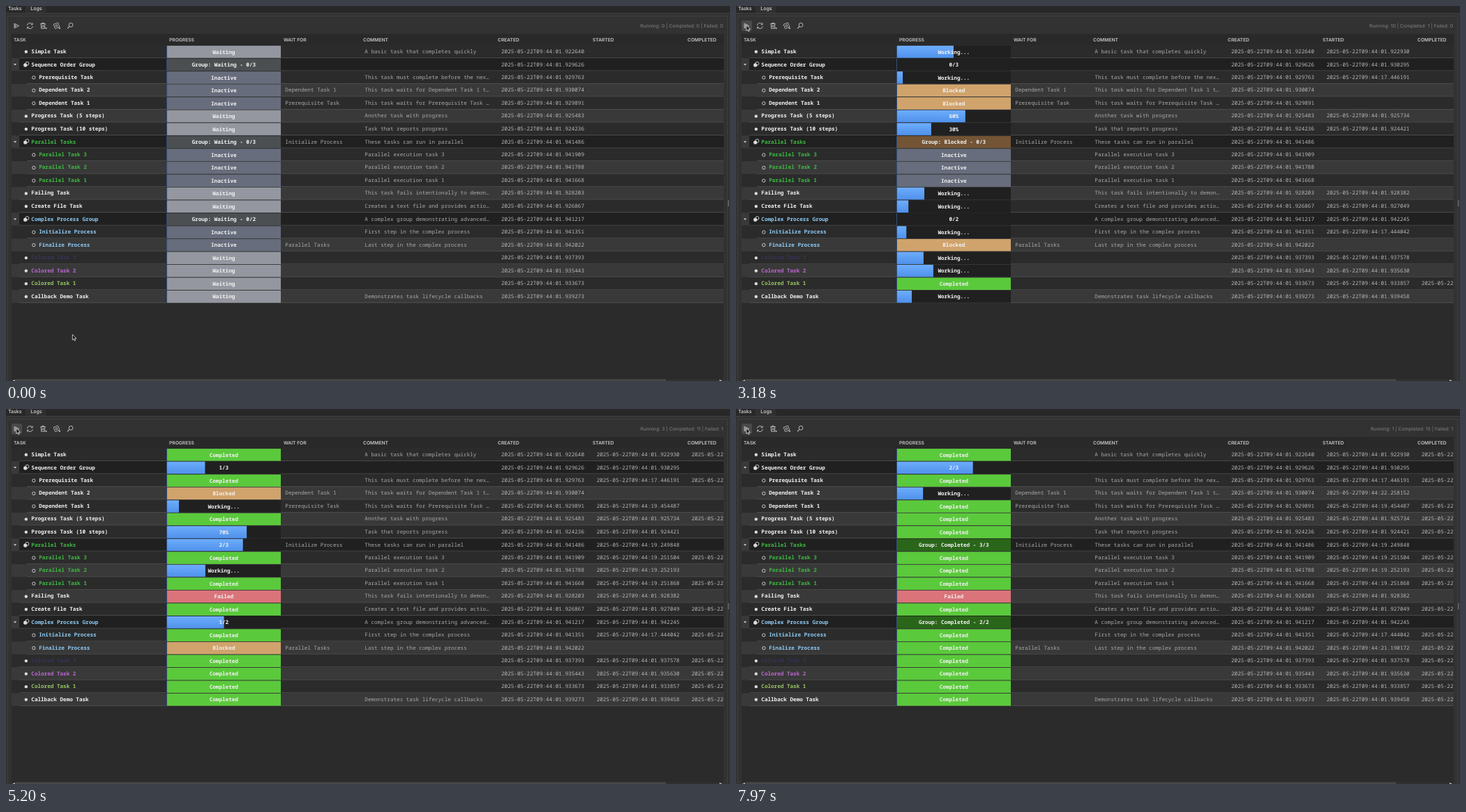
Recreate the animation shown at these times as an HTML page with a canvas. Size 1038 by 539 pixels, loop 8 s.

```html
<!DOCTYPE html>
<html lang="en">
<head>
<meta charset="utf-8">
<title>Task list</title>
<style>
html, body { margin: 0; width: 100%; height: 100%; overflow: hidden; background: #2b2b2b; }
canvas { display: block; width: 1038px; height: 539px; }
</style>
</head>
<body>
<canvas id="stage"></canvas>
<script>
const W = 1038, H = 539, LOOP = 8000;
const ROW_TOP = 56.4, ROW_H = 18.52, BAR_X = 231, BAR_W = 163;
const MONO = '"Noto Sans Mono", "DejaVu Sans Mono", monospace';
const SANS = 'Inter, Roboto, sans-serif';
const DAY = '2025-05-22T09:44:';
const WHITE = '#f2f2f2', GREEN = '#3dbb42', BLUE = '#8ecbf5';

const canvas = document.getElementById('stage');
const dpr = window.devicePixelRatio || 1;
canvas.width = W * dpr;
canvas.height = H * dpr;
const c = canvas.getContext('2d');
c.scale(dpr, dpr);

// start / end: when a task begins and stops working, in ms of the loop
const leaf = (name, created, started, start, end, more) =>
  ({ kind: 'leaf', name, created, started, start, end, ...more });
const child = (...args) => ({ ...leaf(...args), kind: 'child' });
const group = (name, created, started, start, size, more) =>
  ({ kind: 'group', name, created, started, start, size, ...more });

const rows = [
  leaf('Simple Task', '922640', '01.922930', 2078, 4110, { comment: 'A basic task that completes quickly' }),
  group('Sequence Order Group', '929626', '01.930295', 2270, 3),
  child('Prerequisite Task', '929763', '17.446191', 2276, 4335, { comment: 'This task must complete before the nex…' }),
  child('Dependent Task 2', '930074', '22.258152', 7184, 9200, { blocked: 2270, wait: 'Dependent Task 1', comment: 'This task waits for Dependent Task 1 t…' }),
  child('Dependent Task 1', '929891', '19.454487', 4345, 7175, { blocked: 2270, wait: 'Prerequisite Task', comment: 'This task waits for Prerequisite Task …' }),
  leaf('Progress Task (5 steps)', '925483', '01.925734', 2110, 4660, { steps: 5, comment: 'Another task with progress' }),
  leaf('Progress Task (10 steps)', '924236', '01.924421', 2100, 7200, { steps: 10, comment: 'Task that reports progress' }),
  group('Parallel Tasks', '941486', '19.249848', 4140, 3, { blocked: 2265, color: GREEN, wait: 'Initialize Process', comment: 'These tasks can run in parallel' }),
  child('Parallel Task 3', '941909', '19.251504', 4150, 5060, { color: GREEN, comment: 'Parallel execution task 3' }),
  child('Parallel Task 2', '941788', '19.252193', 4150, 6120, { color: GREEN, comment: 'Parallel execution task 2' }),
  child('Parallel Task 1', '941668', '19.251868', 4150, 5000, { color: GREEN, comment: 'Parallel execution task 1' }),
  leaf('Failing Task', '928203', '01.928382', 2404, 4950, { fails: true, comment: 'This task fails intentionally to demon…' }),
  leaf('Create File Task', '926867', '01.927049', 2254, 3750, { comment: 'Creates a text file and provides actio…' }),
  group('Complex Process Group', '941217', '01.942245', 2260, 2, { color: BLUE, comment: 'A complex group demonstrating advanced…' }),
  child('Initialize Process', '941351', '17.444042', 2262, 4140, { color: BLUE, comment: 'First step in the complex process' }),
  child('Finalize Process', '942022', '21.190172', 6134, 7660, { blocked: 2262, color: BLUE, wait: 'Parallel Tasks', comment: 'Last step in the complex process' }),
  leaf('Colored Task 3', '937393', '01.937578', 2195, 3220, { color: '#35355a' }),
  leaf('Colored Task 2', '935443', '01.935630', 2439, 3460, { color: '#bd68d3' }),
  leaf('Colored Task 1', '933673', '01.933857', 2137, 3160, { color: '#98c568' }),
  leaf('Callback Demo Task', '939273', '01.939458', 2355, 4390, { comment: 'Demonstrates task lifecycle callbacks' }),
];

const FILLS = {
  Waiting: '#94979f', Inactive: '#676d7c', Blocked: '#d0a36c',
  Completed: '#5bc93c', Failed: '#da747a',
};
const GROUP_FILLS = { Waiting: '#4c4f52', Blocked: '#735536', Completed: '#2a661a' };

// Each state is { label, fill } for a flat bar or { label, part } for a progress bar
function leafState(row, t) {
  if (t >= row.end) {
    const label = row.fails ? 'Failed' : 'Completed';
    return { label, fill: FILLS[label] };
  }
  if (t >= row.start) {
    if (row.steps) {
      const done = Math.min(row.steps, Math.floor((t - row.start) / 510) + 1);
      return { label: done * 100 / row.steps + '%', part: done / row.steps, running: true };
    }
    const phase = (t - row.start) / 443 % 2;
    return { label: 'Working...', part: phase < 1 ? phase : 2 - phase, running: true };
  }
  const label = t >= row.blocked ? 'Blocked' : row.kind === 'child' ? 'Inactive' : 'Waiting';
  return { label, fill: FILLS[label] };
}

function groupState(row, i, t) {
  const done = rows.slice(i + 1, i + 1 + row.size).filter(r => t >= r.end).length;
  const count = done + '/' + row.size;
  if (t >= row.start && done < row.size) return { label: count, part: done / row.size };
  const name = done === row.size ? 'Completed' : t >= row.blocked ? 'Blocked' : 'Waiting';
  return { label: `Group: ${name} - ${count}`, fill: GROUP_FILLS[name] };
}

function rect(x, y, w, h, fill) {
  c.fillStyle = fill;
  c.fillRect(x, y, w, h);
}

function text(str, x, y, color, font, align = 'left') {
  c.font = font;
  c.fillStyle = color;
  c.textAlign = align;
  c.fillText(str, x, y);
}

const mono = (str, x, y, color, weight = 500, align) =>
  text(str, x, y + 2.7, color, `${weight} 7.64px ${MONO}`, align);

function shape(d, x, y, stroke, fill, width = 0.9) {
  const path = new Path2D(d);
  c.save();
  c.translate(x, y);
  c.lineWidth = width;
  c.lineJoin = 'round';
  if (fill) { c.fillStyle = fill; c.fill(path); }
  if (stroke) { c.strokeStyle = stroke; c.stroke(path); }
  c.restore();
}

function circle(x, y, r, stroke, fill) {
  c.beginPath();
  c.arc(x, y, r, 0, Math.PI * 2);
  if (fill) { c.fillStyle = fill; c.fill(); }
  if (stroke) { c.strokeStyle = stroke; c.lineWidth = 0.9; c.stroke(); }
}

function drawToolbar(hover) {
  const ink = '#c4c4c4';
  if (hover) {
    c.fillStyle = '#4a4a4a';
    c.beginPath();
    c.roundRect(8, 21, 15, 15, 2);
    c.fill();
  }
  shape('M-3-3.3V3.3L3.6 0ZM-3-1.3L0 0L-3 1.3', 15, 28.5, ink);
  shape('M-4-.6A4 4 0 0 1 3.3-2.3M3.8-4.2V-1.8H1.4M4 .6A4 4 0 0 1-3.3 2.3M-3.8 4.2V1.8H-1.4', 34.3, 28.5, ink);
  shape('M-3.6-2.8H3.6M-1.2-2.8V-4H1.2V-2.8M-2.8-2.8L-2.4 4H2.4L2.8-2.8M-.9-1V2.4M.9-1V2.4', 53, 28.3, ink);
  let gear = '';
  for (let i = 0; i < 16; i++) {
    const a = (i + 0.5) * Math.PI / 8, r = i % 4 < 2 ? 4.4 : 3.3;
    gear += `${i ? 'L' : 'M'}${r * Math.cos(a)} ${r * Math.sin(a)}`;
  }
  shape(gear + 'Z', 72.5, 28.3, ink);
  circle(72.5, 28.3, 1.4, ink);
  for (const x of [57.5, 76.8]) shape('M-1.8-.8H1.8L0 1.3Z', x, 32, null, ink);
  circle(93, 27.2, 2.9, ink);
  shape('M-2 2.2L-5 5.2', 93, 27.2, ink, null, 1.1);
}

function drawChrome() {
  rect(0, 0, W, H, '#323232');
  rect(0, 0, W, 10, '#282828');
  rect(28, 0, 29, 10, '#303030');
  rect(0, 10, W, 1, '#404040');
  rect(2, 14, 1033, 1, '#404040');
  rect(2, 14, 1, 525, '#3d3d3d');
  rect(1034, 14, 1, 525, '#3d3d3d');
  rect(1035, 279, 1.5, 9, '#686868');
  rect(8, 40, 1021, 496, '#2b2b2b');
  rect(8, 40, 1021, 16.4, '#292929');
  rect(8, 536, 1021, 3, '#303030');
  rect(14, 536.5, 932, 2.5, '#484848');
  shape('M2-2V2L-2 0Z', 11, 539, null, '#c0c0c0');
  shape('M-2-2V2L2 0Z', 1025, 539, null, '#c0c0c0');
  text('Tasks', 3, 5.6, '#dedede', `500 7px ${SANS}`);
  text('Logs', 35.3, 6.1, '#dedede', `500 7px ${SANS}`);
  const headers = { TASK: 11, PROGRESS: 234, 'WAIT FOR': 398, COMMENT: 512, CREATED: 705, STARTED: 841, COMPLETED: 977 };
  for (const [label, x] of Object.entries(headers)) text(label, x, 50.8, '#c6c6c6', `600 6.7px ${SANS}`);
}

function drawBar(state, y, textY) {
  rect(230, y, 1, 17.6, '#304f7d');
  rect(BAR_X, y, BAR_W, 17.6, state.fill || '#202020');
  if (state.part) {
    const shade = c.createLinearGradient(0, y, 0, y + 17.6);
    shade.addColorStop(0, '#6dadfc');
    shade.addColorStop(1, '#4f91eb');
    rect(BAR_X, y, BAR_W * state.part, 17.6, shade);
  }
  mono(state.label, 312.3, textY, WHITE, 600, 'center');
}

function drawRow(row, i, state, t) {
  const top = ROW_TOP + i * ROW_H, isGroup = row.kind === 'group', isChild = row.kind === 'child';
  const y = 65 + i * ROW_H + (isGroup ? 0.4 : 0);
  const inset = isChild ? 30 : 19;
  rect(8, top, 1021, ROW_H, i % 2 ? '#393939' : '#2b2b2b');
  if (isGroup) rect(19, top, 1010, ROW_H, '#202020');
  rect(inset, top + ROW_H - 0.9, 1029 - inset, 0.9, '#515151');
  drawBar(state, top + 0.7, y + (isGroup ? 0.2 : 0.9));

  if (isGroup) {
    shape('M-2.2-1.2H2.2L0 1.3Z', 13, y + 0.4, null, '#c8c8c8');
    circle(30.3, y - 1.2, 2.5, '#d8d8d8', '#202020');
    circle(27.7, y + 1, 2.6, null, '#dcdcdc');
  } else if (isChild) circle(39.8, y + 0.8, 2.2, '#d8d8d8');
  else circle(28.8, y + 0.8, 2.2, null, '#dcdcdc');

  const grey = '#a9a9a9', stamp = '#b8b8b8';
  mono(row.name, isChild ? 47.2 : 36.3, y, row.color || WHITE, 700);
  if (row.wait) mono(row.wait, 400.3, y, grey);
  if (row.comment) mono(row.comment, 514.3, y, grey);
  mono(DAY + '01.' + row.created, 710, y, stamp);
  if (t >= row.start) mono(DAY + row.started, 846.7, y, stamp);
  if (t >= row.end && !row.fails) mono(DAY, 982.7, y, stamp);
}

const ease = p => p * p * (3 - 2 * p);
const clamp = p => Math.max(0, Math.min(1, p));

function pointer(t) {
  const travel = ease(clamp((t - 271) / 889));
  const settle = 1 - (1 - clamp((t - 1160) / 440)) ** 2;
  return {
    x: 95.3 - 83 * travel + 2.5 * settle,
    y: 472 - 417 * travel - 27.5 * settle,
  };
}

// The screen was refreshed in coarse, regular ticks
function tick(t) {
  if (t < 360) return 0;
  if (t < 2130) return 360 + 89 * Math.floor((t - 350) / 89);
  return 2140 + 87 * Math.floor((t - 2130) / 87);
}

function draw(now) {
  const t = tick(now % LOOP), tip = pointer(t);
  c.textRendering = 'geometricPrecision';
  drawChrome();
  drawToolbar(tip.y < 36);

  const states = rows.map((row, i) => row.kind === 'group' ? groupState(row, i, t) : leafState(row, t));
  const running = states.filter(s => s.running).length;
  const completed = states.filter(s => s.label === 'Completed').length;
  const failed = states.filter(s => s.label === 'Failed').length;
  text(`Running: ${running} | Completed: ${completed} | Failed: ${failed}`, 1028, 31, '#808080', `400 6.9px ${SANS}`, 'right');

  c.save();
  c.beginPath();
  c.rect(8, 40, 1021, 496);
  c.clip();
  rows.forEach((row, i) => drawRow(row, i, states[i], t));
  c.restore();

  shape('M0 0V8L1.8 6.4L3 9.2L4.3 8.6L3.1 5.9H5.6Z', tip.x, tip.y, '#e8e8e8', '#111', 0.8);
}

const begin = performance.now();
function loop() {
  draw(performance.now() - begin);
  requestAnimationFrame(loop);
}
loop();
</script>
</body>
</html>
```
